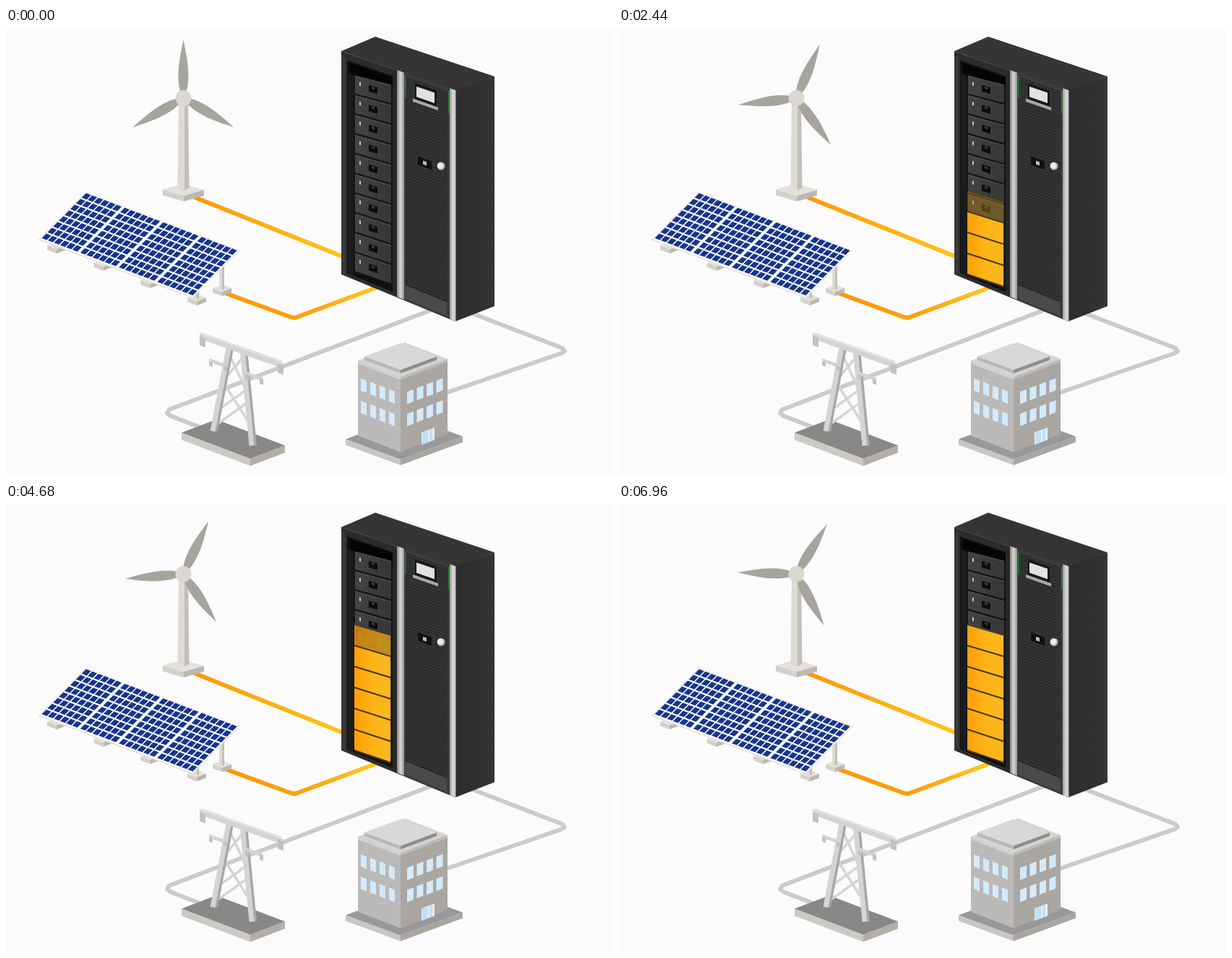
An HTML page with a canvas that plays this animation: 840x620 px, repeating every 7 s.

```html
<!DOCTYPE html>
<html lang="en">
<head>
<meta charset="utf-8">
<title>Energy storage</title>
<style>
html, body { margin: 0; width: 100%; height: 100%; overflow: hidden; background: #fbfbfb; }
canvas { display: block; }
</style>
</head>
<body>
<canvas id="stage" width="840" height="620"></canvas>
<script>
const W = 840, H = 620, LOOP = 7000, STEP = 40;
const view = document.getElementById('stage').getContext('2d');
const still = document.createElement('canvas');
still.width = W;
still.height = H;
let g = still.getContext('2d');

const mix = (a, b, k) => a + (b - a) * k;
const along = (a, b) => k => [mix(a[0], b[0], k), mix(a[1], b[1], k)];

function trace(pts) {
  g.beginPath();
  pts.forEach(p => g.lineTo(...p));
}
function poly(fill, ...pts) {
  trace(pts);
  g.closePath();
  g.fillStyle = fill;
  g.fill();
}
function line(color, width, ...pts) {
  trace(pts);
  g.strokeStyle = color;
  g.lineWidth = width;
  g.stroke();
}
function disc(fill, x, y, r) {
  g.beginPath();
  g.arc(x, y, r, 0, Math.PI * 2);
  g.fillStyle = fill;
  g.fill();
}
function across(x0, x1, ...colors) {
  const grad = g.createLinearGradient(x0, 0, x1, 0);
  colors.forEach((c, i) => grad.addColorStop(i / (colors.length - 1), c));
  return grad;
}

// An upright wall seen at an angle: maps x and depth v below its top to a point
function wall(x0, y0, slope, grow = 0) {
  return (x, v) => [x, y0 + slope * (x - x0) + v * (1 + grow * (x - x0))];
}
function rect(on, fill, x, v, w, h) {
  poly(fill, on(x, v), on(x + w, v), on(x + w, v + h), on(x, v + h));
}
// A box standing with its front bottom corner at (x, y)
function box(x, y, left, right, h, slope, colors) {
  const [top, lit, shade] = colors, t = y - h;
  rect(wall(x, t, slope), lit, x - left, 0, left, h);
  rect(wall(x, t, -slope), shade, x, 0, right, h);
  poly(top, [x, t], [x - left, t - left * slope],
    [x - left + right, t - (left + right) * slope], [x + right, t - right * slope]);
}

const LIT = '#dedad4', SHADE = '#c3bfb8';
const stone = ['#e4e0db', '#d4d0ca', '#bcb8b1'];
const foot = (x, y) => box(x, y, 13, 13, 6, .38, stone);

function cables() {
  g.lineJoin = 'round';
  const gray = '#cbcbcb';
  line(gray, 6, [592, 389], [226, 528], [223, 533], [228, 537], [275, 555]);
  line(gray, 6, [640, 393], [770, 443], [773, 447], [769, 450], [600, 508]);
  line(across(262, 464, '#ff970a', '#ffc41c'), 6, [258, 233], [470, 318]);
  line(across(308, 512, '#ff970a', '#ff9f0c', '#ffc81e'), 6,
    [304, 367], [394, 400], [400, 401], [516, 358]);
}

function tower() {
  box(246, 240, 29, 28, 8, .29, stone);
  poly(LIT, [239, 100], [247, 100], [247, 225], [237.5, 221]);
  poly(SHADE, [247, 100], [252, 100], [253.5, 221], [247, 225]);
}

function post(x, y, h) {
  foot(x, y);
  g.fillStyle = LIT;
  g.fillRect(x - 4, y - h - 9, 4, h);
  g.fillStyle = SHADE;
  g.fillRect(x, y - h - 9, 3, h);
}

function solar() {
  for (let i = 0; i < 4; i++) post(70 + 64.7 * i, 312 + 24 * i, 24);
  post(299, 371, 38);
  const sheet = (u, v) => [111 + 211 * u - 64 * v, 227.5 + 80 * u + 65 * v];
  const tile = (fill, u, v, w, h) =>
    poly(fill, sheet(u, v), sheet(u + w, v), sheet(u + w, v + h), sheet(u, v + h));
  tile('#e1e1e1', -.005, -.008, 1.01, 1.025);
  tile('#fbfbfb', 0, 0, 1, 1);
  const rows = 8, w = .24 / 6, h = .985 / rows;
  for (let i = 0; i < 24; i++) {
    const u = i * w + Math.floor(i / 6) * .0125;
    for (let j = 0; j < rows; j++) tile('#17358a', u + .003, j * h + .012, w * .82, h * .78);
  }
}

function pylon() {
  box(338, 606, 95, 48, 10, .38, ['#898887', '#cdcac5', '#b3afa8']);
  const light = '#d5d4d2', mid = '#c4c2be', dark = '#aaa7a1';
  const left = along([309, 438], [286, 558]), right = along([327, 445], [340, 578]);
  for (let k = 0; k < 2; k++) {
    const a = .08 + .34 * k, b = a + .35;
    line(light, 3.5, left(a), right(b));
    line(light, 3.5, right(a), left(b));
  }
  line(light, 3.5, right(.55), left(.95));
  for (const leg of [left, right]) {
    const [a, b] = [leg(0), leg(1)];
    line(dark, 4, [a[0] + 5, a[1]], [b[0] + 5, b[1]]);
    line(light, 7, a, b);
  }
  const arm = (x0, x1, y, h, drop) => {
    const beam = wall(x0, y, .36);
    rect(beam, light, x0, 0, x1 - x0, h);
    rect(beam, mid, x0, 4, h, drop);
    rect(beam, mid, x1 - h, 3, h, drop);
  };
  arm(281, 306, 457, 5, 6);
  arm(331, 356, 475, 5, 7);
  arm(268, 384, 422, 8, 13);
  line('#e2e1df', 3, [271, 423], [382, 462]);
}

function building() {
  box(546, 605, 76, 86, 8, .37, ['#99989a', '#c9c6c1', '#aaa69f']);
  box(546, 587, 59, 65, 104, .385, ['#d3d3d3', '#bbbab9', '#aaa6a2']);
  const west = wall(546, 483, .385), east = wall(546, 483, -.385);
  rect(west, '#d0d0d0', 487, 0, 59, 4);
  rect(east, '#bebbb8', 546, 0, 65, 4);
  box(546, 478, 50, 50, 5, .37, ['#d8d8d8', '#b8b8b8', '#8f8e8d']);
  for (let row = 0; row < 2; row++) {
    for (let i = 0; i < 4; i++) {
      rect(west, '#d2eafa', 491 + 13 * i, 23 + 31 * row, 8, 17);
      rect(east, '#d2eafa', 555 + 13.5 * i, 24 + 30.5 * row, 9, 17);
    }
  }
  rect(east, '#e9eef1', 575, 88, 18, 17);
  rect(east, '#bfe0f5', 576, 89, 8, 16);
  rect(east, '#bfe0f5', 586, 89, 4, 16);
}

const front = wall(464, 32, .342, .00023);
const rack = wall(483, 66, .26, .0003);

function darkModule(k) {
  const v = 27.3 * k;
  rect(rack, '#191919', 482, v - 1, 52, 27);
  rect(rack, across(483, 533, '#434343', '#363636'), 483, v, 50, 24.5);
  rect(rack, '#555555', 483, v, 50, 1);
  rect(rack, '#c4c4c4', 489, v + 7, 2, 5);
  rect(rack, '#0d0d0d', 502, v + 8, 12, 9);
  rect(rack, '#3c3c3c', 506, v + 9, 4, 3);
}

function cabinet() {
  poly('#353535', [464, 32], [511, 12], [676, 67], [623, 87]);
  poly(across(622, 676, '#2c2c2c', '#343434'), [622, 86], [676, 67], [676, 385], [622, 406]);
  rect(front, '#2c2c2c', 464, 0, 158, 309);
  rect(front, '#454545', 464, 0, 158, 1);
  rect(front, '#393939', 464, 6, 6, 301);
  rect(front, '#101010', 472, 10, 69, 294);
  rect(front, '#050505', 476, 12, 60, 15);
  rect(front, '#272727', 535, 6, 7, 299);
  rect(front, '#1b1b1b', 473, 27, 8, 277);
  for (let k = 0; k < 10; k++) darkModule(k);

  rect(front, '#3c3c3c', 551, 0, 63, 308);
  rect(front, '#2c2c2c', 553, 5, 58, 283);
  for (let v = 7; v < 286; v += 4) rect(front, '#393939', 554, v, 56, 1.5);
  rect(front, '#4a4a4a', 552, 288, 58, 18);
  rect(front, across(541, 551, '#858585', '#d8d8d8', '#959595'), 541, 0, 10, 308);
  rect(front, across(614, 623, '#959595', '#dadada', '#b8b8b8'), 614, 0, 8.5, 309);
  for (const x of [552, 612]) rect(front, '#238a2b', x, 4, 1.5, 30);

  rect(front, '#191919', 566, 9, 30, 22);
  rect(front, '#dfe2e4', 568, 13, 25, 14);
  rect(front, '#a9a9a9', 563, 31, 35, 4);
  rect(front, '#101010', 570, 107, 19, 11);
  rect(front, '#bdbdbd', 577, 110, 5, 5);
  disc('#b8b8b8', 602, 191, 5.5);
  disc('#ececec', 601, 190.5, 4);
}

g.fillStyle = '#fbfbfb';
g.fillRect(0, 0, W, H);
cables();
tower();
solar();
pylon();
building();
cabinet();
g = view;

// Modules charge from the bottom up, each a little later than the last
function charge(t) {
  for (let i = 0; i < 6; i++) {
    const start = 620 * i + 40 * i * i, span = i ? 850 : 700;
    const v = 247 - 29 * i;
    g.globalAlpha = Math.min(1, Math.max(0, (t - start) / span));
    rect(rack, '#4a3510', 482, v - 1, 50.5, 30);
    rect(rack, across(482, 532, '#ff9e0a', '#ffb416', '#f8b822'), 482, v, 50, 27);
  }
  g.globalAlpha = 1;
}

function rotor(t) {
  g.save();
  g.translate(245.5, 97);
  g.rotate(t * .108 * Math.PI / 180);
  g.fillStyle = '#a7a49e';
  for (let i = 0; i < 3; i++) {
    g.beginPath();
    g.moveTo(0, -81);
    for (const side of [1, -1]) {
      const to = side > 0 ? -8 : -81;
      if (side > 0) g.bezierCurveTo(4, -60, 11, -32, 4, to);
      else {
        g.lineTo(-4, -8);
        g.bezierCurveTo(-11, -32, -4, -60, 0, to);
      }
    }
    g.fill();
    g.rotate(Math.PI * 2 / 3);
  }
  g.restore();
  disc('#dbd7d1', 245.5, 97, 11);
}

const begin = performance.now();
function frame() {
  const now = Math.max(0, performance.now() - begin) % LOOP;
  const t = Math.floor(now / STEP) * STEP;
  g.drawImage(still, 0, 0);
  charge(t);
  rotor(t);
  requestAnimationFrame(frame);
}
frame();
</script>
</body>
</html>
```
